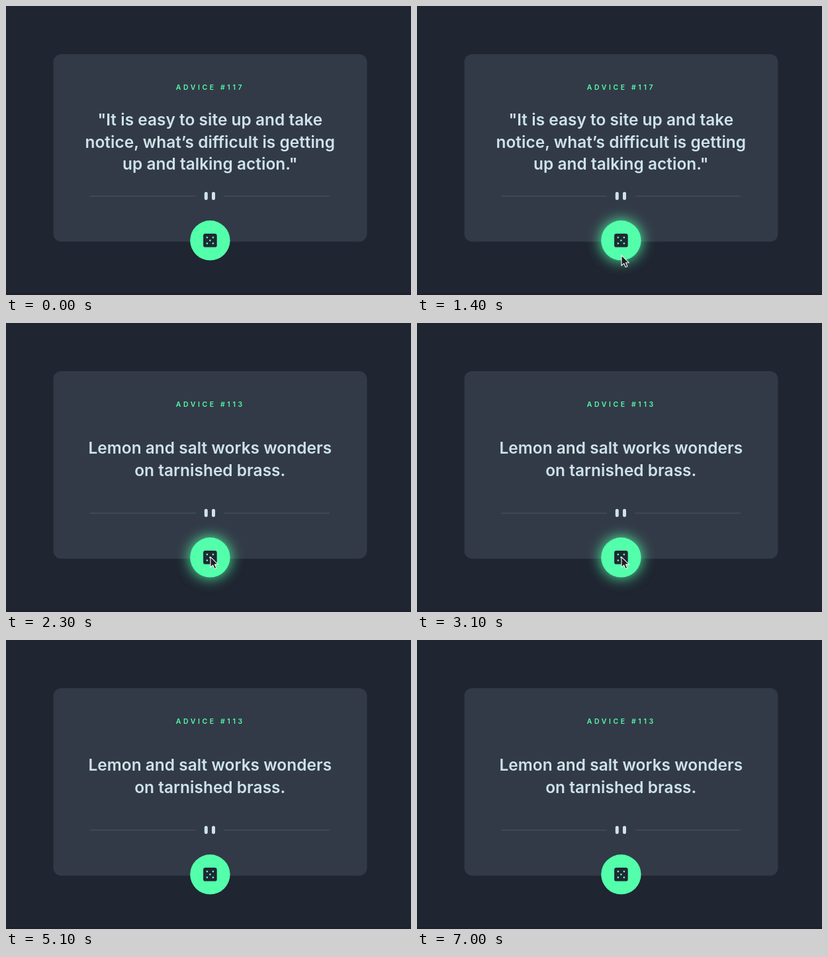
Write an HTML page that moves like this. It is 612x438 px and loops after 7.9 s.

```html
<!DOCTYPE html>
<html lang="en">
<head>
<meta charset="utf-8">
<title>Advice card</title>
<style>
  html, body { margin: 0; width: 100%; height: 100%; overflow: hidden; background: #1f2531; }
  svg { display: block; width: 100%; height: 100%; }
  text { font-family: Inter, "Open Sans", sans-serif; font-weight: 600; }
  #label { font-size: 10.5px; letter-spacing: 3.6px; fill: #53ffaa; }
  #quote { font-size: 24.4px; letter-spacing: .05px; fill: #cee3e9; text-anchor: middle; }
</style>
</head>
<body>
<svg viewBox="0 0 612 438">
  <defs>
    <filter id="blur" x="-100%" y="-100%" width="300%" height="300%" color-interpolation-filters="sRGB">
      <feGaussianBlur stdDeviation="10.5"/>
    </filter>
  </defs>
  <rect width="612" height="438" fill="#1f2531"/>
  <rect y="435" width="612" height="3" fill="#20202c"/>
  <rect x="71.5" y="73" width="474" height="284.3" rx="12" fill="#323a47"/>
  <text id="label" x="256.7" y="126.7"></text>
  <g id="quote"></g>
  <path d="M127 288.3H287M330 288.3H489" stroke="#434d5b" stroke-width="1.4"/>
  <path d="M302.3 284.3V291.5M313.5 284.3V291.5" stroke="#cee3e9" stroke-width="5" stroke-linecap="round"/>
  <g transform="translate(308.4 355.3)">
    <circle id="glow" r="30.2" fill="#53ffaa" filter="url(#blur)"/>
    <circle r="30.2" fill="#53ffaa"/>
    <rect x="-10.3" y="-10.3" width="20.6" height="20.6" rx="3.2" fill="#202733"/>
    <path d="M-4.5 -4.5h0M4.5 -4.5h0M0 0h0M-4.5 4.5h0M4.5 4.5h0"
          stroke="#53ffaa" stroke-width="2.8" stroke-linecap="round"/>
  </g>
  <path id="cursor" d="M0 0V15.6L3.7 12.2L6.2 17.9L8.9 16.7L6.4 11.2H11.4Z"
        fill="#1d1d22" stroke="#f4f6f6" stroke-width="1.1" stroke-linejoin="round"/>
</svg>
<script>
const LOOP = 7900, STEP = 100, SWAP = 2300;
const BUTTON = { x: 308.4, y: 355.3, r: 30.2 };
const $ = id => document.getElementById(id);

const tips = [
  { no: 117, lines: ['"It is easy to site up and take', 'notice, what’s difficult is getting', 'up and talking action."'] },
  { no: 113, lines: ['Lemon and salt works wonders', 'on tarnished brass.'] }
];

// The cursor glides in, rests on the button and speeds away
const visits = [
  { enter: 800, arrive: 2000, leave: 4500, gone: 5100, power: 1,
    from: { x: 309, y: 401 }, rest: { x: 309, y: 354.7 }, to: { x: 324, y: 440 } },
  { enter: 5800, arrive: 6100, leave: 6700, gone: 7000, power: 2,
    from: { x: 308, y: 416 }, rest: { x: 307, y: 361 }, to: { x: 311, y: 410 } }
];

const progress = (t, a, b) => Math.min(1, Math.max(0, (t - a) / (b - a)));
const easeOut = (p, n) => 1 - (1 - p) ** n;
const easeIn = (p, n) => p ** n;
const mix = (a, b, p) => ({ x: a.x + (b.x - a.x) * p, y: a.y + (b.y - a.y) * p });

function cursorAt(t) {
  const v = visits.find(v => t >= v.enter && t < v.gone);
  if (!v) return null;
  return t < v.leave
    ? mix(v.from, v.rest, easeOut(progress(t, v.enter, v.arrive), v.power))
    : mix(v.rest, v.to, easeIn(progress(t, v.leave, v.gone), 3));
}

let shown;
function showTip(tip) {
  if (tip === shown) return;
  shown = tip;
  const leading = 33.6, top = 214.8 - (tip.lines.length - 1) * leading / 2;
  $('label').textContent = 'ADVICE #' + tip.no;
  $('quote').innerHTML = tip.lines
    .map((line, i) => `<text x="308.3" y="${top + i * leading}">${line}</text>`).join('');
}

function render(ms) {
  const t = Math.floor((ms % LOOP) / STEP) * STEP;
  const tip = cursorAt(t);
  const hover = tip && Math.hypot(tip.x - BUTTON.x, tip.y - BUTTON.y) < BUTTON.r;
  showTip(tips[t < SWAP ? 0 : 1]);
  $('glow').style.display = hover ? '' : 'none';
  $('cursor').style.display = tip ? '' : 'none';
  if (tip) $('cursor').setAttribute('transform', `translate(${tip.x} ${tip.y})`);
}

let start;
function tick(now) {
  start ??= now;
  render(now - start);
  requestAnimationFrame(tick);
}
render(0);
requestAnimationFrame(tick);
</script>
</body>
</html>
```
